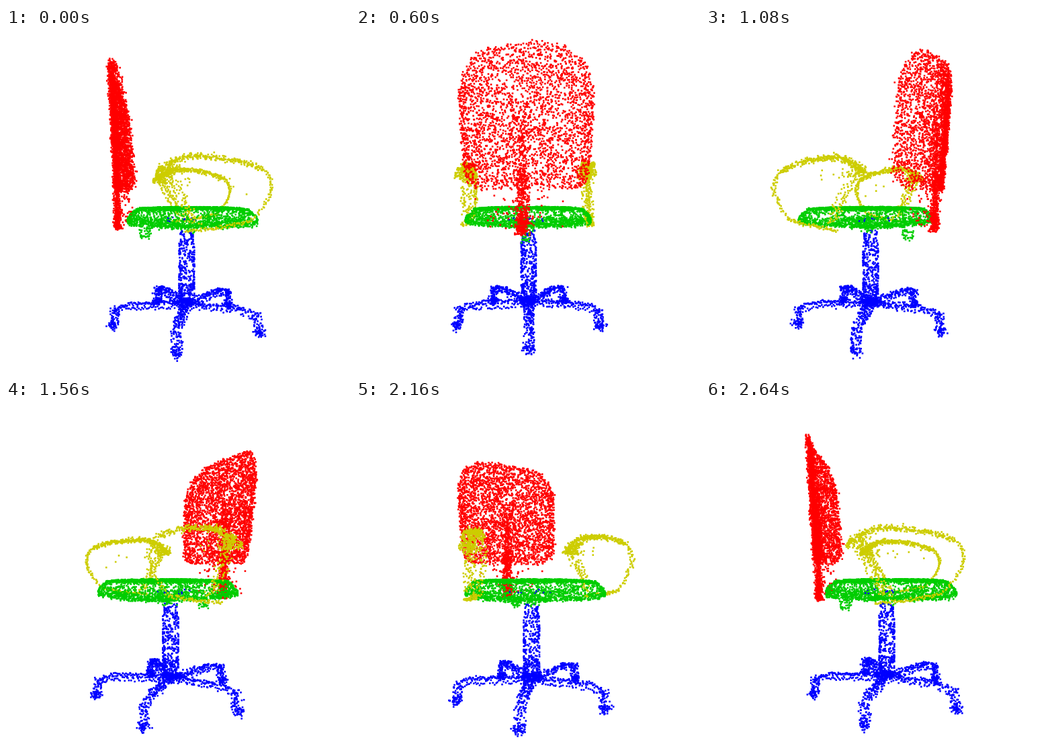
Recreate the animation shown at these times as an HTML page with a canvas. Size 512 by 512 pixels, loop 2700 ms.

```html
<!DOCTYPE html>
<html lang="en">
<head>
<meta charset="utf-8">
<title>Rotating chair point cloud</title>
<style>
  html, body { margin: 0; width: 100%; height: 100%; overflow: hidden; background: #fff; }
  canvas { display: block; width: 512px; height: 512px; }
</style>
</head>
<body>
<canvas id="stage" width="512" height="512"></canvas>
<script>
const ctx = document.getElementById('stage').getContext('2d');
const RED = '#ff0000', GREEN = '#00cd00', YELLOW = '#cdcd00', BLUE = '#0000ff';
const STEP = 60, STEPS = 45, START = 5.5, EYE = 500, DOT = 2.6;
const TAU = Math.PI * 2, RAD = Math.PI / 180;

let seed = 20417;
function rnd() {
  seed = (seed * 1664525 + 1013904223) % 4294967296;
  return seed / 4294967296;
}
const span = (a, b) => a + (b - a) * rnd();
const jit = r => span(-r, r);
const bell = r => (rnd() + rnd() + rnd() - 1.5) / 1.5 * r;
const mix = (a, b, t) => a + (b - a) * t;

// Chair space: x forward, y up from eye level, z sideways.
const cloud = [];
const dot = (color, x, y, z) => cloud.push({ color, x, y, z, sx: 0, sy: 0, depth: 0 });
const times = (n, make) => { for (let i = 0; i < n; i++) make(i, (i + rnd()) / n); };

function backrest() {
  const place = (u, v) => {
    const low = 13 + 17 * Math.pow(u, 10);
    const high = 189 - 14 * u * u - 34 * Math.pow(u, 8);
    const y = mix(low, high, v);
    const h = (y - 13) / 176;
    const half = 79 + 6 * Math.min(1, h * 2);
    const x = -(90 + 9 * h) + (25 - 7 * h) * u * u;
    dot(RED, x + bell(6), y + jit(2), 2.5 + u * half + jit(1.5));
  };
  times(2950, () => place(span(-1, 1), rnd()));
  times(150, i => place((i % 2 ? 1 : -1) * span(0.88, 1), rnd()));
  // spine and its loose mounting
  times(330, () => dot(RED, -90 + bell(7), span(-41, 40), bell(13)));
  times(110, () => dot(RED, -91 + bell(6), span(40, 110), bell(15)));
  times(110, () => dot(RED, -88 + bell(9), span(-43, -18), bell(13)));
  times(60, () => dot(RED, span(-94, -68), span(-35, 12), bell(72)));
}

function seat() {
  const place = (r, y) => {
    const a = rnd() * TAU, c = Math.cos(a), s = Math.sin(a);
    const bend = v => Math.sign(v) * Math.pow(Math.abs(v), 0.75);
    dot(GREEN, 19 + 93 * r * bend(c), y, 93 * r * bend(s));
  };
  times(1050, () => {
    const r = Math.sqrt(rnd()) * 0.88;
    place(r, -12 - 4 * Math.pow(r, 6) + jit(1));
  });
  times(750, () => {
    const r = Math.sqrt(rnd());
    place(r, -38 + 6 * r * r + bell(5));
  });
  times(600, () => {
    const t = rnd();
    place(0.86 + 0.14 * Math.sin(t * 2), -13 - 21 * t + jit(1.5));
  });
  times(34, () => dot(GREEN, span(-57, -40), span(-57, -42), jit(6)));
  times(30, () => dot(GREEN, span(6, 29), span(-50, -38), jit(9)));
}

function arm(side) {
  const put = (x, y, z) => dot(YELLOW, x, y, side * z - 2.5);
  const padY = x => 54 - Math.pow((x - 12) / (x < 12 ? 10.2 : 20.5), 2);
  times(320, () => {
    const t = Math.pow(rnd(), 1.45), x = mix(-35, 97, t);
    put(x, padY(x) + bell(6), mix(87, 100, t) + jit(mix(12, 4, t)));
  });
  times(60, () => put(bell(20) - 18, span(28, 47), span(74, 96)));
  times(48, (i, t) => {
    const k = 1 - t;
    const x = k * k * 96 + 2 * k * t * 120 + t * t * 83;
    const y = k * k * 37 + 2 * k * t * 15 - t * t * 22;
    put(x + jit(2), y + jit(1), 101 + jit(4));
  });
  times(70, (i, t) => put(mix(83, 0, t), mix(-22, -38, Math.sqrt(t)) + jit(2), mix(101, 94, t) + jit(6)));
  times(85, (i, t) => put(mix(-24, 14, t) + jit(8), mix(38, -30, t), mix(84, 94, t) + jit(8)));
  times(8, () => put(span(-20, 80), span(5, 38), span(85, 100)));
}

function base() {
  const cx = 13;
  const ring = (n, r, low, high) => times(n, () => {
    const a = rnd() * TAU;
    dot(BLUE, cx + r * Math.cos(a), span(low, high), r * Math.sin(a));
  });
  ring(55, 9.5, -66, -45);
  ring(250, 11.5, -142, -64);
  ring(60, 9, -152, -125);
  times(150, () => dot(BLUE, cx + bell(20), -153 + bell(8), bell(20)));
  times(9, () => dot(BLUE, cx + jit(32), span(-32, -26), jit(32)));

  for (let k = 0; k < 5; k++) {
    const a = (31.5 + 72 * k) * RAD, c = Math.cos(a), s = Math.sin(a);
    const put = (r, y, w) => dot(BLUE, cx + r * c - w * s, y, r * s + w * c);
    times(145, (i, t) => {
      const y = -153 + 5 * t - 10 * Math.pow(t, 8);
      put(mix(6, 106, t), y - (i % 3 ? jit(2) : span(3, 9)), jit(mix(8, 6, t)));
    });
    times(45, () => put(span(99, 112), span(-180, -154), jit(7)));
    times(40, () => put(108 + bell(12), -180 + bell(9), bell(11)));
  }
}

backrest();
seat();
arm(1);
arm(-1);
base();

function draw(step) {
  const a = (START + step * 360 / STEPS) * RAD, c = Math.cos(a), s = Math.sin(a);
  for (const p of cloud) {
    p.depth = p.z * c - p.x * s;
    const k = EYE / (EYE - p.depth);
    p.sx = 256 + (p.x * c + p.z * s) * k;
    p.sy = 256 - p.y * k;
  }
  cloud.sort((p, q) => p.depth - q.depth);
  ctx.fillStyle = '#fff';
  ctx.fillRect(0, 0, 512, 512);
  for (const p of cloud) {
    ctx.fillStyle = p.color;
    ctx.fillRect(p.sx - DOT / 2, p.sy - DOT / 2, DOT, DOT);
  }
}

const begin = performance.now();
let shown = 0;
function tick() {
  const step = Math.floor((performance.now() - begin) / STEP) % STEPS;
  if (step !== shown) draw(shown = step);
  requestAnimationFrame(tick);
}
draw(0);
requestAnimationFrame(tick);
</script>
</body>
</html>
```
